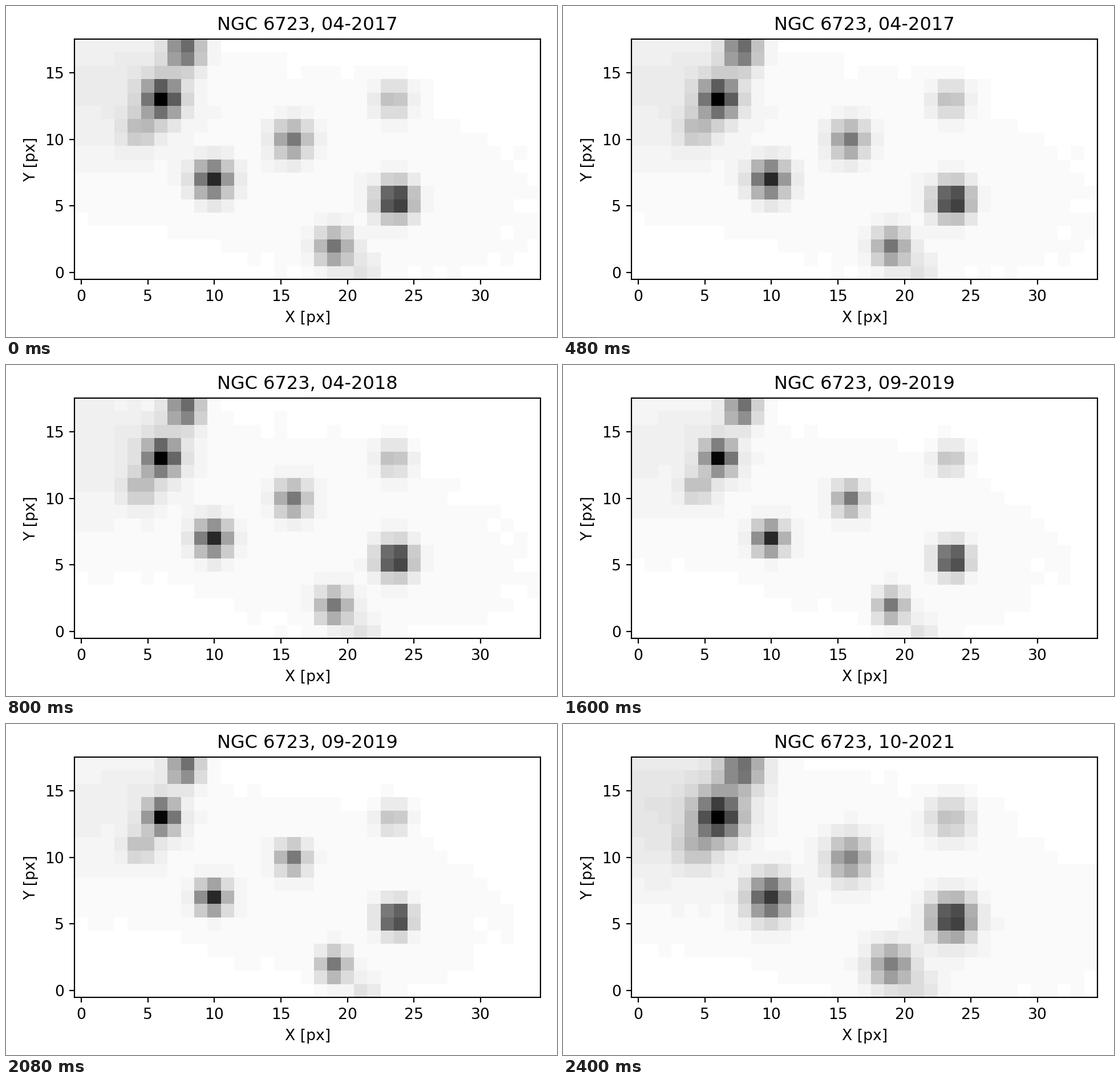
A matplotlib script that plays this animation: 966x580 px, repeating every 3200 ms.

```python
import numpy as np
import matplotlib.pyplot as plt
from matplotlib.animation import FuncAnimation

W, H, DPI = 966, 580, 192
COLS, ROWS = 35, 18
LEFT, RIGHT, BASE = 120.3, 937.2, 101.4
CELL = (RIGHT - LEFT) / COLS

# Date and seeing, the star width in pixels
EPOCHS = [("04-2017", 0.89), ("04-2018", 0.84),
          ("09-2019", 0.76), ("10-2021", 1.07)]
TYPICAL = 0.89

# x, y, peak
STARS = [
    (6.12, 13.06, 0.92),
    (9.88, 7.00, 0.82),
    (15.85, 9.93, 0.50),
    (23.45, 12.92, 0.26),
    (23.60, 5.44, 0.89),
    (19.03, 1.87, 0.52),
    (7.80, 16.65, 0.62),
    (4.45, 10.75, 0.24),
    (21.20, 0.00, 0.11),
]

X, Y = np.meshgrid(np.arange(COLS), np.arange(ROWS))
GRAIN = np.random.default_rng(4).normal(0, 0.0015, (ROWS, COLS))


def blob(x, y, sx, sy, peak, tilt=0):
    u, v = (X - x) / sx, (Y - y) / sy
    return peak * np.exp(-(u * u + v * v + tilt * u * v) / 2)


def exposure(seeing):
    """Stars blurred by the seeing, over a sky that brightens with it."""
    blur = seeing / TYPICAL
    sky = blur ** 2
    gain = min(1, blur ** -0.4)
    field = np.minimum(sky * blob(16, 8, 10, 4.5, 0.04, tilt=0.8), 0.024)
    field += GRAIN
    field += sky * blob(0, 14.5, 3.5, 4.5, 0.065)
    field += sky * blob(5.7, 14, 1.8, 2, 0.085)
    field += gain * sum(blob(x, y, seeing, seeing, p) for x, y, p in STARS)
    return np.clip(np.round(field / 0.02) * 0.02, 0, 1)


plt.rcParams["font.family"] = "DejaVu Sans"
fig = plt.figure(figsize=(W / DPI, H / DPI), dpi=DPI, facecolor="white")
ax = fig.add_axes([LEFT / W, BASE / H, COLS * CELL / W, ROWS * CELL / H])
image = ax.imshow(np.zeros((ROWS, COLS)), cmap="gray_r", vmin=0, vmax=1,
                  origin="lower", aspect="auto", interpolation="nearest")
ax.set_xticks(range(0, COLS, 5))
ax.set_yticks(range(0, ROWS, 5))
ax.set_xlim(-0.5, COLS - 0.5)
ax.set_ylim(-0.5, ROWS - 0.5)
ax.set_xlabel("X [px]")
ax.set_ylabel("Y [px]")
title = ax.set_title("")


def draw(i):
    date, seeing = EPOCHS[i]
    image.set_data(exposure(seeing))
    title.set_text(f"NGC 6723, {date}")
    return image, title


anim = FuncAnimation(fig, draw, frames=len(EPOCHS), interval=800,
                     repeat=True, repeat_delay=0, blit=False)
plt.show()
```
